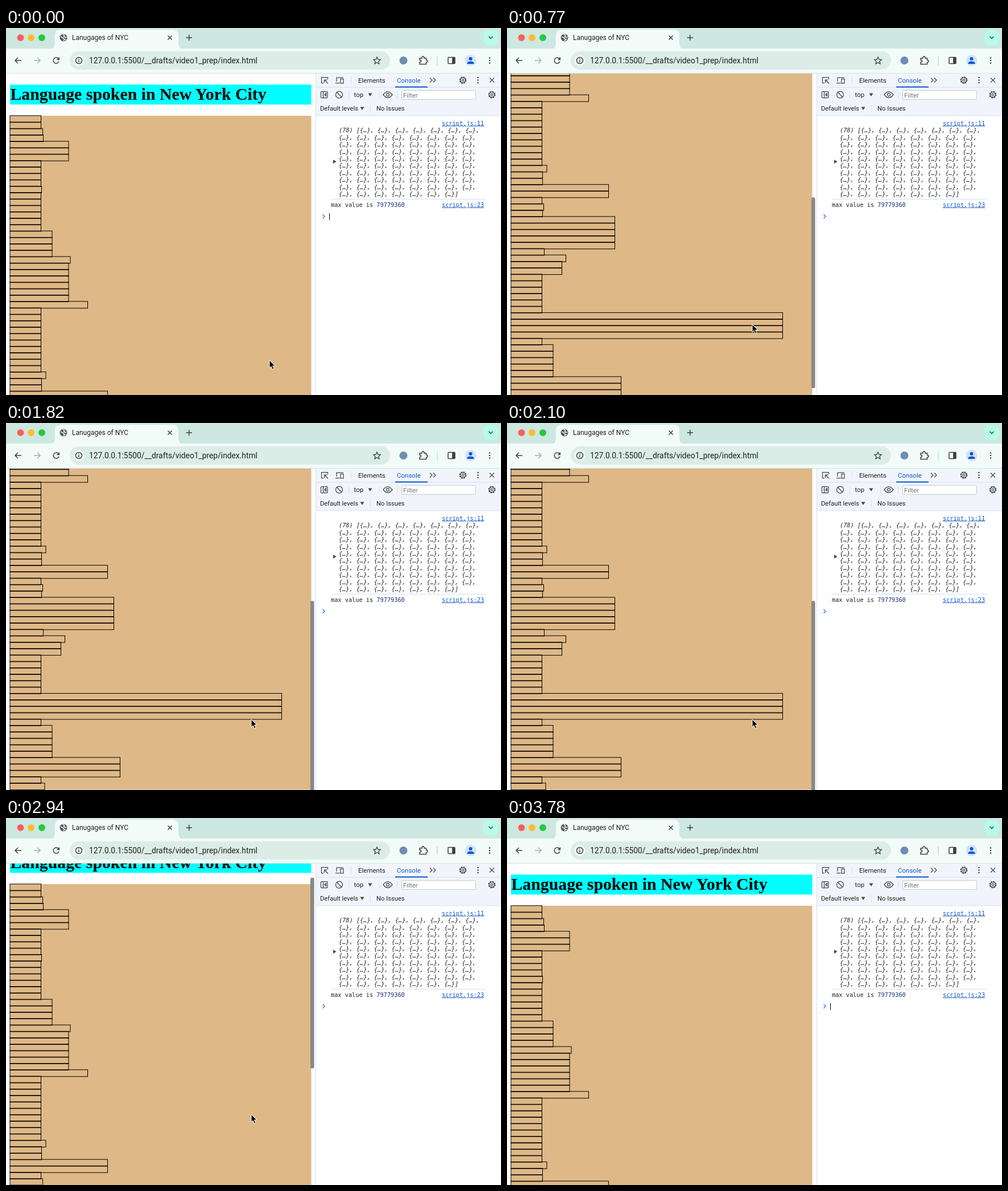
An HTML page for the animation above (3.85 s loop, 870x644 px).

```html
<!DOCTYPE html>
<html lang="en">
<head>
<meta charset="utf-8">
<title>Browser scroll</title>
<style>
html, body { margin: 0; width: 100%; height: 100%; overflow: hidden; background: #fff; }
svg { display: block; }
text { font-family: Roboto, sans-serif; fill: #1f1f1f; white-space: pre; }
.h1 { font: bold 29.8px "Liberation Serif", serif; fill: #000; }
.tab { font-size: 12px; }
.url { font-size: 13.8px; }
.ui { font-size: 11.2px; }
.big { font-size: 11.5px; }
.mono { font: 10.28px "DejaVu Sans Mono", monospace; }
.it { font-style: italic; }
.link { fill: #1155cc; text-decoration: underline; }
.line { fill: none; stroke: #3c4043; stroke-width: 1.5; }
.thin { fill: none; stroke: #474747; stroke-width: 1.25; }
.dark { fill: #474747; }
.sep { stroke: #d3e0f5; stroke-width: 1; }
#bars rect { fill: none; stroke: #000; stroke-width: 1; }
</style>
</head>
<body>
<svg width="870" height="644" viewBox="0 0 870 644">
  <defs>
    <clipPath id="view"><rect y="80" width="544" height="564"/></clipPath>
    <g id="dots"><circle cy="-4.5" r="1.3"/><circle r="1.3"/><circle cy="4.5" r="1.3"/></g>
    <g id="gear">
      <circle r="5.4" fill="none" stroke="#474747" stroke-width="2" stroke-dasharray="2.4 1.84"/>
      <circle r="4.6" class="thin"/><circle r="1.8" class="thin"/>
    </g>
  </defs>

  <!-- page -->
  <g clip-path="url(#view)">
    <g id="page">
      <rect x="7" y="99.3" width="529.5" height="35" fill="#0ff"/>
      <text class="h1" x="7.5" y="126">Language spoken in New York City</text>
      <rect x="7" y="154" width="529.5" height="877" fill="#deb887"/>
      <g id="bars"></g>
    </g>
    <rect id="thumb" x="535" width="6.6" rx="3.3" fill="#898887"/>
  </g>
  <path id="cursor" d="M0 0V13.6L3.1 10.8L5.4 16L7.9 15L5.6 9.9H9.8Z" fill="#000" stroke="#fff" stroke-width="1"/>

  <!-- tab strip -->
  <rect width="870" height="37" fill="#cde8e1"/>
  <path d="M76 37Q86 37 86 27V13Q86 3 96 3H293Q303 3 303 13V27Q303 37 313 37Z" fill="#f2fbf8"/>
  <circle cx="25.500" cy="17" r="6" fill="#fe5f57"/>
  <circle cx="44" cy="17" r="6" fill="#febc2e"/>
  <circle cx="63" cy="17" r="6" fill="#28c840"/>
  <circle cx="101" cy="17" r="6.5" fill="#51575b"/>
  <path d="M96 15.500Q99 16 100.500 18T103.500 20Q101 21.500 101.500 23M99.500 11.500Q104 12 102 14.500T106.500 16" fill="none" stroke="#f2fbf8" stroke-width="1.5"/>
  <text class="tab" x="116" y="20.500">Lanugages of NYC</text>
  <path class="line" d="M284.500 13.500L291.500 20.500M291.500 13.500L284.500 20.500M316.500 17H327M321.700 11.800V22.200"/>
  <rect x="839" y="4" width="26" height="26" rx="9" fill="#b6fde9"/>
  <path class="line" d="M848.500 15L852 18.500L855.500 15"/>

  <!-- address bar -->
  <rect y="36" width="870" height="43.500" fill="#f2fbf8"/>
  <rect y="79" width="870" height="1" fill="#d3e3df"/>
  <rect x="112" y="41" width="563" height="32" rx="16" fill="#dcede7"/>
  <path class="line" d="M27 57H16M21 52L16 57L21 62"/>
  <path class="line" style="stroke:#a6b0ae" d="M49 57H60M55 52L60 57L55 62"/>
  <path class="line" d="M92.500 54.500A5 5 0 1 0 93 58.500M93.300 51.500V55.500H89.300"/>
  <circle cx="128" cy="57" r="9.500" fill="#f2fbf8"/>
  <circle class="line" cx="128" cy="57" r="5.500"/>
  <path class="line" d="M128 56V60M128 53.500V55"/>
  <text class="url" x="146" y="62">127.0.0.1:5500/__drafts/video1_prep/index.html</text>
  <path class="line" style="stroke-width:1.3" d="M652 51L653.800 55.100L658.200 55.500L654.900 58.400L655.900 62.800L652 60.500L648.100 62.800L649.100 58.400L645.800 55.500L650.200 55.100Z"/>
  <circle cx="698.500" cy="57" r="7" fill="#6d8db4"/>
  <path class="line" d="M727 53H731Q731 49.800 733 49.800T735 53H738.500V56.300Q741 56.300 741 58.300T738.500 60.300V63.500H727V60Q729.500 60 729.500 58T727 56Z"/>
  <path d="M758 50V65" stroke="#a9eddb" stroke-width="1.5"/>
  <rect class="line" x="777" y="51.500" width="12" height="11" rx="1"/>
  <rect x="784" y="51.500" width="5" height="11" fill="#3c4043"/>
  <circle cx="816.500" cy="57" r="10" fill="#d2e3fc"/>
  <circle cx="816.500" cy="54" r="3" fill="#0b57d0"/>
  <path d="M810.500 63V61.500Q811 58.500 816.500 58.500T822.500 61.500V63Z" fill="#0b57d0"/>
  <use href="#dots" x="850" y="57" fill="#3c4043"/>

  <!-- devtools -->
  <rect x="544" y="80" width="326" height="564" fill="#fff"/>
  <rect x="544" y="80" width="326" height="74" fill="#f1f5fb"/>
  <path class="sep" d="M544.500 80V644M544 104H870M544 153.800H870M606.500 85V98M602.500 111V124M656.500 111V124M687.500 111V124M640.500 135V148"/>
  <path class="thin" d="M558 96.500H554.500V86.500H565.500V90"/>
  <path class="thin" d="M559.500 91L566 97.500M559.500 96V91H564.500" stroke-width="1.5"/>
  <path class="thin" d="M581 94V87H593M579 96.500H586.500"/>
  <rect class="thin" x="588" y="89.500" width="5" height="7.500"/>
  <text class="big" x="619" y="95.500">Elements</text>
  <text class="big" x="687" y="95.500" style="fill:#0b57d0">Console</text>
  <rect x="684" y="102.500" width="57" height="2" fill="#0b57d0"/>
  <path class="thin" d="M745 87.500L749 91.500L745 95.500M751 87.500L755 91.500L751 95.500"/>
  <use href="#gear" x="803" y="91.500"/>
  <use href="#dots" x="829.500" y="91.500" class="dark"/>
  <path class="thin" d="M850 87.500L858 95.500M858 87.500L850 95.500"/>

  <rect class="thin" x="553.500" y="111.500" width="11.500" height="11" rx="1"/>
  <path class="thin" d="M557.500 111.500V122.500M562.500 114.500L559.800 117L562.500 119.500Z"/>
  <circle class="thin" cx="585.500" cy="117" r="6"/>
  <path class="thin" d="M581.300 112.800L589.700 121.200"/>
  <text class="big" x="611.500" y="121">top</text>
  <path class="dark" d="M636.500 114.500H643.500L640 120Z"/>
  <path class="thin" d="M663 117Q671 106.500 679 117Q671 127.500 663 117Z"/>
  <circle class="thin" cx="671" cy="117" r="2.500"/>
  <rect x="695.500" y="109.500" width="130" height="16" rx="2" fill="#fff" stroke="#c5c9d0"/>
  <text class="big" x="698" y="121.500" style="fill:#757575">Filter</text>
  <use href="#gear" x="854" y="117"/>
  <text class="ui" x="552" y="145">Default levels</text>
  <path class="dark" d="M622.500 138.500H629.500L626 144Z"/>
  <text class="ui" x="651" y="145">No Issues</text>

  <text class="mono link" x="766" y="170.500">script.js:11</text>
  <g id="log"></g>
  <path class="dark" d="M575 231L580.500 234.500L575 238Z"/>
  <path d="M571 300.300H844" stroke="#cfdff8"/>
  <text class="mono" x="571" y="313.800">max value is <tspan fill="#1a2f7a">79779360</tspan></text>
  <text class="mono link" x="766" y="313.800">script.js:23</text>
  <path d="M556.500 327L560 330.500L556.500 334" fill="none" stroke="#3b78e7" stroke-width="1.4"/>
  <rect id="caret" x="568" y="325" width="1" height="12" fill="#000"/>
</svg>
<script>
const LOOP = 3850, STEP = 70, BLINK = 565, MAX = 387.5;
const $ = id => document.getElementById(id);

function add(parent, tag, attrs, text = "") {
  const el = document.createElementNS("http://www.w3.org/2000/svg", tag);
  for (const k in attrs) el.setAttribute(k, attrs[k]);
  el.textContent = text;
  parent.append(el);
}

// right edge x number of equal bars
const runs = "61.5x2 64.5 65.5 110x3 61.5x4 62.5 61.5x6 81x4 113x1 110x6 143.5 61.5x10 70 62.5x2 " +
  "178.5x2 61.5 64.5 62.5 189.5x5 65.5 103.5 96.5x2 61.5x6 484.5x4 61.5 81x5 200.5x3 61.5 68";
let row = 0;
for (const run of runs.split(" ")) {
  const [right, count = 1] = run.split("x").map(Number);
  for (let i = 0; i < count; i++, row++)
    add($("bars"), "rect", { x: 7, y: 153.8 + row * 11.24, width: right - 7, height: 11.9 });
}

for (let i = 0; i < 10; i++) {
  const items = Array(i % 9 ? 8 : 7).fill("{…}").join(", ");
  const line = (i ? "" : "(78) [") + items + (i < 9 ? "," : "]");
  add($("log"), "text", { class: "mono it", x: 585, y: 183.3 + i * 12.4 }, line);
}

const scroll = [[350, 0], [420, 12], [490, 55], [560, 130], [630, 225], [700, 310], [770, 362.5],
  [840, 385], [910, 394], [980, 395.5], [1050, 392.5], [1190, 389.5], [1260, 389.5], [1330, 392],
  [1400, 393], [1610, 388], [1680, 388], [1820, MAX], [1890, 390], [2100, MAX], [2380, MAX],
  [2450, 384], [2520, 368], [2590, 337], [2660, 296], [2730, 235], [2870, 95], [2940, 38],
  [3010, 3], [3080, -8], [3220, -3.5], [3360, -1.5], [3570, 0]];
const mouseX = [[0, 463], [140, 431], [3080, 431], [3360, 439]];
const mouseY = [[0, 583], [140, 520], [3080, 520], [3220, 590], [3360, 660]];
const fade = [[350, 0], [420, 1], [3500, 1], [3710, 0]];

function at(keys, t) {
  const i = keys.findIndex(k => k[0] > t);
  if (i < 0) return keys[keys.length - 1][1];
  if (!i) return keys[0][1];
  const [t0, a] = keys[i - 1], [t1, b] = keys[i];
  return a + (b - a) * (t - t0) / (t1 - t0);
}

function draw() {
  const t = Math.floor(performance.now() % LOOP / STEP) * STEP;
  const y = at(scroll, t), inside = Math.min(MAX, Math.max(0, y)), over = y - inside;
  $("page").setAttribute("transform", `translate(0 ${-y})`);
  $("thumb").setAttribute("y", 82 + inside * 0.5937 + Math.max(0, over) * 0.2);
  $("thumb").setAttribute("height", 335 - Math.abs(over) * 0.2);
  $("thumb").setAttribute("opacity", at(fade, t));
  $("cursor").setAttribute("transform", `translate(${at(mouseX, t)} ${at(mouseY, t)})`);
  const phase = Math.floor((t - 620) / BLINK);
  $("caret").setAttribute("opacity", phase & 1 || t < 620 ? 1 : 0);
  requestAnimationFrame(draw);
}
draw();
</script>
</body>
</html>
```
